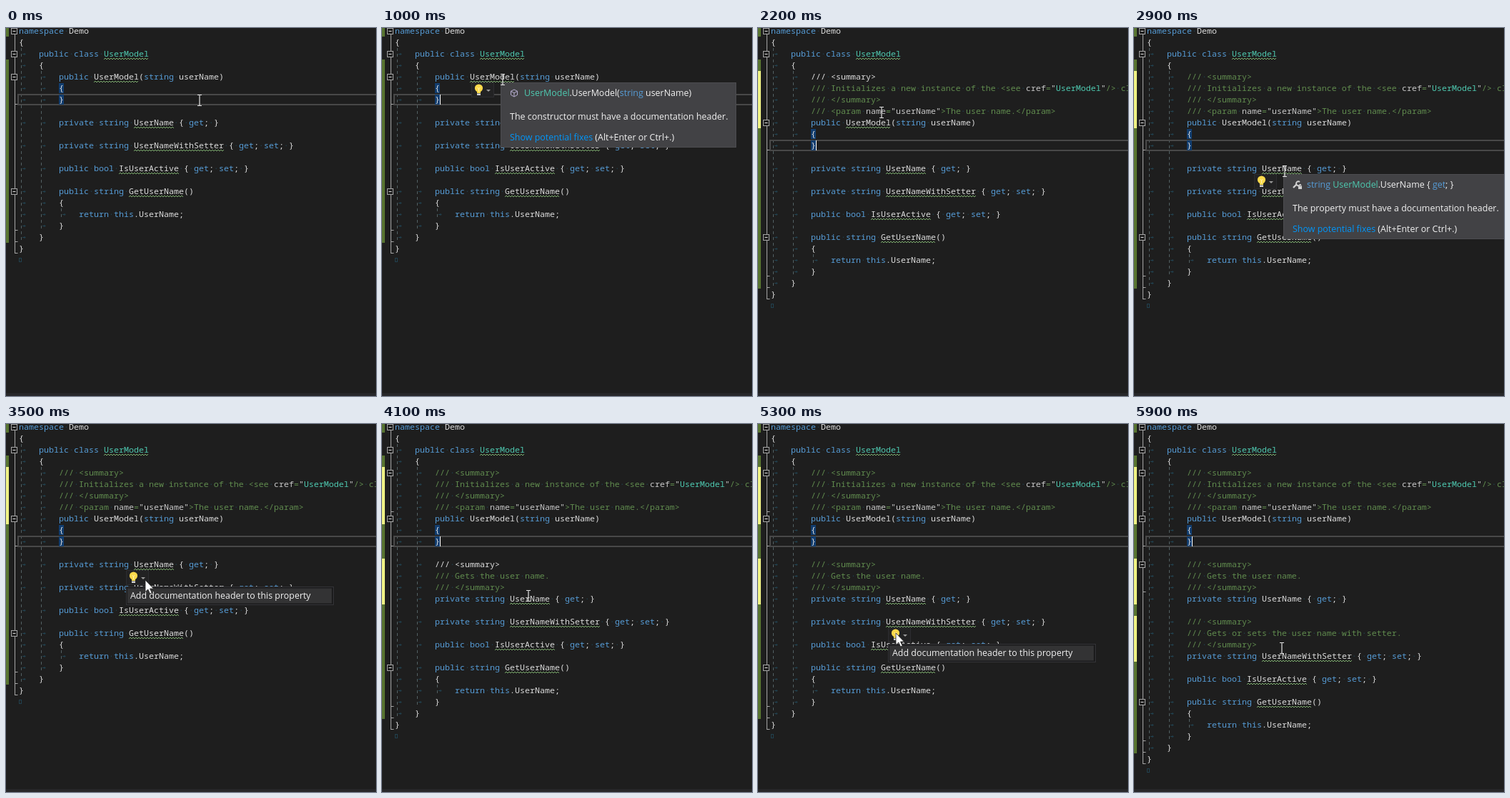
An HTML page that plays this animation: 518x514 px, repeating every 6 s.

```html
<!DOCTYPE html>
<html lang="en">
<head>
<meta charset="utf-8">
<title>Documentation header fixes</title>
<style>
  html, body { margin: 0; width: 100%; height: 100%; overflow: hidden; background: #1e1e1e; }
  svg { display: block; width: 518px; height: 514px; }
  text { white-space: pre; }
  .code { font: 11.667px "Noto Sans Mono", "DejaVu Sans Mono", monospace; }
  .mini { font: 8.5px "Noto Sans Mono", "DejaVu Sans Mono", monospace; }
  .strong { font-weight: 600; }
  .ui { font: 12.45px "Open Sans", "Noto Sans", sans-serif; }
</style>
</head>
<body>
<svg id="stage" viewBox="0 0 518 514" xmlns="http://www.w3.org/2000/svg"></svg>
<script>
const LOOP = 6000, STEP = 100;
const CHAR = 7, ROW = 16, LEFT = 18, TAB = 28;
const C = {
  bg: '#1e1e1e', text: '#dcdcdc', key: '#569cd6', type: '#4ec9b0', doc: '#608b4e',
  attr: '#c8c8c8', dim: '#21414f', guide: '#526163', fold: '#a5a5a5', saved: '#577430',
  changed: '#eff284', wave: '#7fb070', white: '#f1f1f1', link: '#0097fb', edge: '#333337'
};
const APPLY = [2200, 4100, 5800];
const stage = document.getElementById('stage');

const esc = s => s.replace(/&/g, '&amp;').replace(/</g, '&lt;');
const rect = (x, y, w, h, fill, stroke = 'none') =>
  `<rect x="${x}" y="${y}" width="${w}" height="${h}" fill="${fill}" stroke="${stroke}"/>`;
const line = (d, stroke, more = '') => `<path d="${d}" fill="none" stroke="${stroke}" ${more}/>`;
const mid = r => 4 + ROW * r;

// Splits a line of C# into [text, colour] parts.
function tokens(s, plain) {
  if (plain) return [[s, C.text]];
  if (s.startsWith('///'))
    return s.split(/((?:name|cref)(?==)|"|UserModel|userName(?="))/).map(p =>
      [p, p === 'UserModel' ? C.type : /^(name|cref|"|userName)$/.test(p) ? C.attr : C.doc]);
  const words = /(\b(?:namespace|public|class|private|string|bool|get|set|return|this)\b)/;
  return s.split(words).map((p, i, all) =>
    [p, i % 2 ? C.key : all[i - 1] === 'class' ? C.type : C.text]);
}

function mono(x, y, parts, cls = 'code', w = CHAR) {
  let col = 0;
  const spans = parts.map(([s, c]) => {
    const span = `<tspan x="${x + col * w}" fill="${c}">${esc(s)}</tspan>`;
    col += s.length;
    return s ? span : '';
  });
  return `<text class="${cls}" y="${y}">${spans.join('')}</text>`;
}

const ui = (x, y, ...parts) => `<text class="ui" x="${x}" y="${y + 4.3}">` +
  parts.map(([s, c = C.white]) => `<tspan fill="${c}">${esc(s)}</tspan>`).join('') + '</text>';

const DOCS = [
  ['/// <summary>', '/// Initializes a new instance of the <see cref="UserModel"/> class.',
    '/// </summary>', '/// <param name="userName">The user name.</param>'],
  ['/// <summary>', '/// Gets the user name.', '/// </summary>'],
  ['/// <summary>', '/// Gets or sets the user name with setter.', '/// </summary>']
];
const SIGNS = [
  'public UserModel(string userName)',
  'private string UserName { get; }',
  'private string UserNameWithSetter { get; set; }'
];

function source(level, fresh) {
  const row = (d, s, more) => ({ d, s, ...more });
  const member = (k, more) => {
    const done = level > k, folded = level > k + 1;
    const docs = done ? DOCS[k] : [];
    return [
      ...docs.map((s, i) => row(2, s, {
        changed: true, fold: folded && !i, end: folded && i === docs.length - 1,
        plain: fresh && level === k + 1 && !i
      })),
      row(2, SIGNS[k], { changed: done, ...more })
    ];
  };
  const gap = row(0, '');
  return [
    row(0, 'namespace Demo', { fold: true }),
    row(0, '{'),
    row(1, 'public class UserModel', { fold: true, wave: 'UserModel' }),
    row(1, '{'),
    ...member(0, { fold: true, wave: !level || (level === 1 && fresh) ? 'UserModel' : '' }),
    row(2, '{', { brace: true }),
    row(2, '}', { brace: true, current: true, end: true }),
    gap,
    ...member(1, { wave: level < 3 ? 'UserName' : '' }),
    gap,
    ...member(2, { wave: 'UserNameWithSetter' }),
    gap,
    row(2, 'public bool IsUserActive { get; set; }', { wave: 'IsUserActive' }),
    gap,
    row(2, 'public string GetUserName()', { fold: true, wave: 'GetUserName' }),
    row(2, '{'),
    row(3, 'return this.UserName;'),
    row(2, '}', { end: true }),
    row(1, '}', { end: true }),
    row(0, '}', { end: true })
  ];
}

function wave(x, y, w) {
  let d = `M${x} ${y + 1}`;
  for (let i = 2; i <= w; i += 2) d += `L${x + i} ${y + (i % 4 ? -1 : 1)}`;
  return line(d, C.wave);
}

function editor(level, fresh) {
  const rows = source(level, fresh), last = rows.length - 1;
  let back = '', front = '';
  const guide = (x, a, b) => line(`M${x} ${mid(a) - 8}V${mid(b) + 8}`, C.guide, 'stroke-dasharray="4 4"');
  back += guide(21.5, 2, last - 1) + guide(49.5, 4, last - 2) + guide(77.5, last - 3, last - 3);
  back += line(`M12.5 8V${mid(last) + 7}`, C.fold);
  rows.forEach((r, i) => {
    const y = mid(i), x = LEFT + r.d * TAB;
    if (!i || (i > 2 && i < last))
      back += rect(0, y - 8, 4, ROW, r.changed ? C.changed : C.saved);
    if (r.end) back += line(`M12.5 ${y + 6.5}h4`, C.fold);
    if (r.fold)
      front += rect(7.5, y - 3.5, 8, 8, C.bg, C.fold) + line(`M9.5 ${y + .5}h4`, C.text);
    if (r.current)
      back += `<rect x="17" y="${y - 7}" width="520" height="14" fill="none" stroke="#484848" stroke-width="2"/>`;
    if (r.brace) front += rect(x, y - 7, CHAR, 14, '#113d6f');
    for (let t = 0; t < r.d; t++)
      front += line(`M${LEFT + 5 + t * TAB} ${y + .5}h4m-1.5 -1.5l1.5 1.5l-1.5 1.5`, C.dim);
    if (!r.s) return;
    front += mono(x, y + 4, [[r.s.replace(/./g, c => c === ' ' ? '·' : ' '), C.dim]]);
    front += mono(x, y + 4, tokens(r.s, r.plain));
    if (r.wave) front += wave(x + r.s.indexOf(r.wave) * CHAR, y + 7, r.wave.length * CHAR);
  });
  return back + front + rect(18.5, mid(last + 1) - 2.5, 3, 5, 'none', C.dim);
}

const bulb = (x, y) => rect(x + .5, y - 9.5, 31, 20, '#222223', '#2d2d30') +
  `<circle cx="${x + 10.5}" cy="${y - 2}" r="5.6" fill="#fbd94b"/>` +
  rect(x + 8, y + 2, 5, 3, '#fbd94b') + rect(x + 8, y + 5.5, 5, 2.5, '#d0d0d0') +
  `<path d="M${x + 21} ${y}h6l-3 3z" fill="#999"/>` +
  line(`M${x + 8.5} ${y - 3}l2 2l2 -2M${x + 10.5} ${y - 1}v4`, '#fff3b5');

const cube = (x, y) =>
  line(`M${x} ${y - 5}l4.5 2.3v5.2l-4.5 2.5l-4.5 -2.5v-5.2zM${x - 4.5} ${y - 2.7}l4.5 2.4l4.5 -2.4M${x} ${y - .3}v5`, '#b8aed2');
const wrench = (x, y) =>
  line(`M${x - 5} ${y + 4}l5 -5`, '#d0d0d0', 'stroke-width="2.4"') +
  line(`M${x + 4} ${y - 4}a3 3 0 1 0 1 3`, '#d0d0d0', 'stroke-width="2"') +
  rect(x + 2, y + 2, 5, 4, '#d0d0d0') + line(`M${x + 3} ${y + 2}v-1.5h3v1.5`, '#d0d0d0');

const tip = (x, y, w, icon, kind, ...title) => rect(x + .5, y + .5, w, 90, '#424245', '#4d4d50') +
  icon(x + 19, y + 15) + ui(x + 33, y + 15, ...title) +
  ui(x + 13, y + 48, [`The ${kind} must have a documentation header.`]) +
  ui(x + 13, y + 77, ['Show potential fixes', C.link], [' (Alt+Enter or Ctrl+.)']);

function menu(x, y, w, kind, open) {
  const item = open ? w - 24 : w - 4;
  let s = rect(x + .5, y - .5, w, 25, '#1b1b1c', C.edge) +
    rect(x + 2, y + 1.5, item, 21, '#333334') +
    ui(x + 6, y + 12, [`Add documentation header to this ${kind}`]);
  if (open)
    s += rect(x + w - 22.5, y + 1.5, 21, 21, '#1f2225', '#3a76b8') +
      `<path d="M${x + w - 13} ${y + 8.5}l4 3.5l-4 3.5z" fill="#aaa"/>`;
  return s;
}

function preview(x, y, k, kind) {
  const lines = [...DOCS[k], SIGNS[k]], end = y + 77 + 13 * lines.length;
  const small = (dx, cy, parts, cls = '') => mono(x + dx, cy + 3, parts, 'mini ' + cls, 5.1);
  let s = rect(x + .5, y + .5, 380, end + 61 - y, '#1b1b1c', C.edge) +
    `<path d="M${x + 15} ${y + 8}l8 15h-16z" fill="#fc0" stroke="#fc0" stroke-linejoin="round"/>` +
    line(`M${x + 15} ${y + 13}v5m0 1.5v2`, '#111', 'stroke-width="2"') +
    ui(x + 29, y + 17, [`${kind}MustHaveHeader`, C.link], [` The ${kind.toLowerCase()} must have a`]) +
    ui(x + 6, y + 34, ['documentation header.']) +
    rect(x + 3, y + 45, 375, end + 6 - y - 45, C.bg) + line(`M${x + 3} ${y + 45.5}h375`, '#b4b4b4') +
    small(7, y + 51, [['...', C.white]], 'strong') + small(7, y + 64, [['{', C.white]]) +
    small(7, end - 1, [['...', C.white]], 'strong');
  lines.forEach((l, i) =>
    s += small(29, y + 77 + 13 * i, tokens(l), l.startsWith('///') ? '' : 'strong'));
  return s + line(`M${x + 1} ${end + 10.5}h380`, C.edge) +
    ui(x + 10, end + 25, ['Preview changes', C.link]) +
    ui(x + 10, end + 47, ['Fix all occurrences in: Document | Project | Solution']);
}

// Each layer is shown from its first time up to its second.
const layers = [];
function layer(from, to, svg) {
  stage.insertAdjacentHTML('beforeend', `<g>${svg}</g>`);
  layers.push({ from, to, el: stage.lastElementChild });
}

stage.innerHTML = rect(0, 0, 518, 514, C.bg);
layer(0, APPLY[0], editor(0, false));
APPLY.forEach((t, i) => {
  layer(t, t + 100, editor(i + 1, true));
  layer(t + 100, APPLY[i + 1] || LOOP, editor(i + 1, false));
});
layer(0, LOOP, rect(0, 510, 518, 4, '#27272a'));

const prop = (name, access) =>
  [['string ', C.key], ['UserModel', C.type], [`.${name} { `], ['get', C.key], ['; '],
    ...(access ? [['set', C.key], ['; ']] : []), ['}']];
const FIXES = [
  { x: 125, row: 68, w: 303, tipW: 329, kind: 'constructor', icon: cube, at: [900, 1300, 1500, 1600],
    title: [['UserModel', C.type], ['.UserModel('], ['string', C.key], [' userName)']] },
  { x: 168, row: 196, w: 290, tipW: 317, kind: 'property', icon: wrench, at: [2800, 3200, 3400, 3600],
    title: prop('UserName') },
  { x: 182, row: 276, w: 290, tipW: 345, kind: 'property', icon: wrench, at: [4600, 4900, 5200, 5400],
    title: prop('UserNameWithSetter', true) }
];
FIXES.forEach((f, k) => {
  const [show, leave, open, expand] = f.at, done = APPLY[k];
  const label = f.kind[0].toUpperCase() + f.kind.slice(1);
  layer(show, done, bulb(f.x, f.row + 18));
  layer(show, leave, tip(f.x + 41, f.row + 8, f.tipW, f.icon, f.kind, ...f.title));
  layer(open, expand, menu(f.x, f.row + 32, f.w, f.kind, false));
  layer(expand, done, menu(f.x, f.row + 32, f.w, f.kind, true) +
    preview(f.x + f.w, f.row + 32, k, label));
});

stage.insertAdjacentHTML('beforeend',
  `<g id="caret">${rect(81, 0, 1, 14, '#fff')}</g>` +
  `<g id="beam">${line('M-3 -7.5h2.5l.5 .5l.5 -.5h2.5M0 -7V7M-3 7.5h2.5l.5 -.5l.5 .5h2.5', '#e4e4e4', 'stroke-width="1.2"')}</g>` +
  '<g id="arrow"><path d="M0 0V16.5L3.8 13L6.6 19L9.2 17.8L6.5 12H11.5Z" fill="#fff" stroke="#222" stroke-width=".8"/></g>');
const [caret, beam, arrow] = ['caret', 'beam', 'arrow'].map(id => document.getElementById(id));

// Pointer stops: time, x, y.
const PATH = [
  [0, 271, 101], [200, 271, 101], [800, 169, 72], [1100, 169, 72], [1500, 136, 82],
  [1700, 136, 82], [2100, 173, 118], [2300, 173, 118], [2700, 211, 200], [3000, 211, 200],
  [3400, 195, 218], [3500, 195, 218], [3900, 205, 240], [4100, 205, 240], [4500, 224, 280],
  [4800, 224, 280], [5100, 193, 292], [5300, 193, 292], [5700, 207, 313], [LOOP, 207, 313]
];

function pointer(t) {
  const i = PATH.findIndex(p => p[0] > t);
  const [t0, x0, y0] = PATH[i - 1], [t1, x1, y1] = PATH[i];
  const u = (t - t0) / (t1 - t0), e = u * u * (3 - 2 * u);
  return [x0 + (x1 - x0) * e, y0 + (y1 - y0) * e];
}

const show = (el, on) => { el.style.display = on ? '' : 'none'; };
const start = performance.now();

function draw() {
  const t = Math.floor(((performance.now() - start) % LOOP) / STEP) * STEP;
  layers.forEach(l => show(l.el, t >= l.from && t < l.to));

  const level = APPLY.filter(a => t >= a).length;
  const since = t - (level ? APPLY[level - 1] : -530);
  const menuOpen = FIXES.some((f, k) => t >= f.at[2] && t < APPLY[k]);
  show(caret, !menuOpen && since % 1060 < 530);
  caret.setAttribute('transform', `translate(0 ${level ? 157 : 93})`);

  const [x, y] = pointer(t);
  const overPopup = FIXES.some((f, k) => t >= f.at[1] && t < APPLY[k]);
  show(arrow, overPopup);
  show(beam, !overPopup);
  (overPopup ? arrow : beam).setAttribute('transform', `translate(${Math.round(x)} ${Math.round(y)})`);
  requestAnimationFrame(draw);
}
draw();
</script>
</body>
</html>
```
